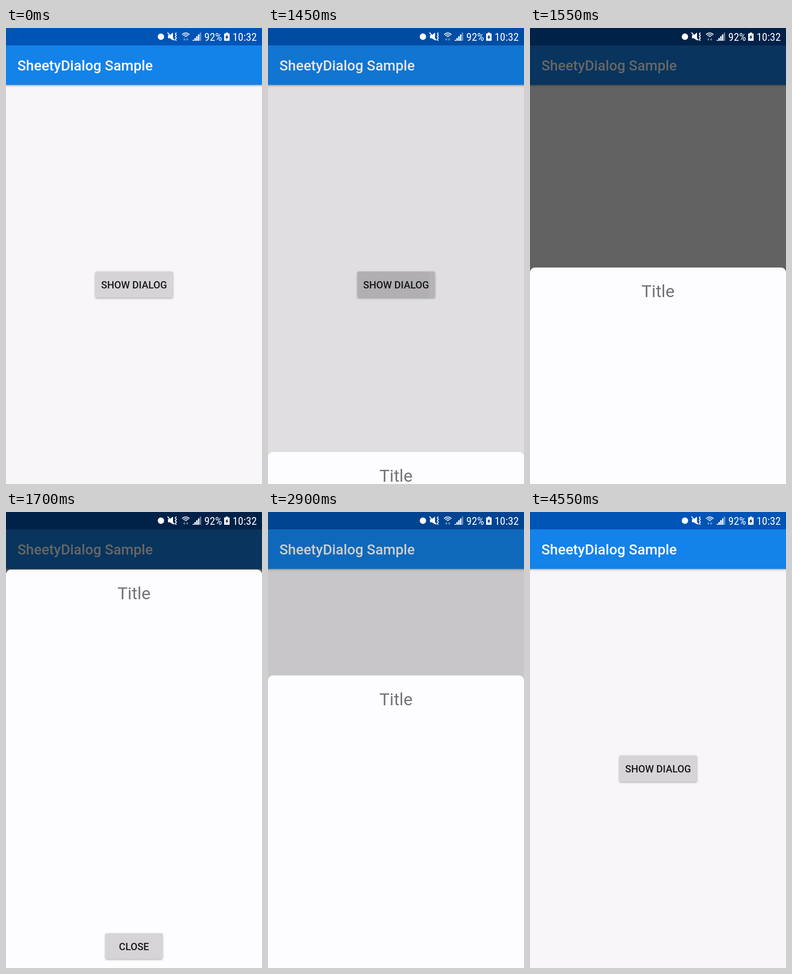
An HTML page with a canvas for the animation above (5.55 s loop, 561 by 998 pixels).

```html
<!DOCTYPE html>
<html lang="en">
<head>
<meta charset="utf-8">
<title>Bottom sheet dialog</title>
<style>
  html, body { margin: 0; width: 100%; height: 100%; overflow: hidden; background: #f8f6f9; }
  canvas { display: block; }
</style>
</head>
<body>
<canvas id="stage" width="561" height="998"></canvas>
<script>
const W = 561, H = 998, LOOP = 5550, STEP = 50;
const STATUS_H = 38, BAR_BOTTOM = 124.5, SHEET_TOP = 126;
const SLIDE = 290, FADE = 120, MAX_DIM = 0.6;
const OPEN = 1397, CLOSE = 2800;
const FAINT = 'rgba(255,255,255,.45)';
const ctx = document.getElementById('stage').getContext('2d');

const ramp = (t, start, length) => Math.min(1, Math.max(0, (t - start) / length));
const ease = p => (1 - Math.cos(Math.PI * p)) / 2;

function rect(x, y, w, h, color) {
  ctx.fillStyle = color;
  ctx.fillRect(x, y, w, h);
}

function circle(x, y, r, color) {
  ctx.fillStyle = color;
  ctx.beginPath();
  ctx.arc(x, y, r, 0, 2 * Math.PI);
  ctx.fill();
}

function trace(points) {
  ctx.beginPath();
  points.forEach(([x, y]) => ctx.lineTo(x, y));
}

function poly(points, color) {
  trace(points);
  ctx.fillStyle = color;
  ctx.fill();
}

function line(points) {
  trace(points);
  ctx.strokeStyle = '#fff';
  ctx.lineWidth = 2;
  ctx.stroke();
}

function text(str, x, y, font, color, align = 'center') {
  ctx.font = `${font} Roboto, sans-serif`;
  ctx.textAlign = align;
  ctx.fillStyle = color;
  ctx.fillText(str, x, y);
}

function withShadow(blur, offset, alpha, draw) {
  ctx.save();
  ctx.shadowColor = `rgba(0,0,0,${alpha})`;
  ctx.shadowBlur = blur;
  ctx.shadowOffsetY = offset;
  draw();
  ctx.restore();
}

function button(label, x, y, w, h, elapsed) {
  ctx.beginPath();
  ctx.roundRect(x, y, w, h, 3);
  ctx.fillStyle = '#d6d4d7';
  withShadow(4, 1.5, 0.35, () => ctx.fill());

  // Touch ripple: a tint over the whole button and a growing circle.
  const press = ramp(elapsed, -50, 150) * (1 - ramp(elapsed, 450, 150));
  if (press > 0) {
    ctx.save();
    ctx.clip();
    rect(x, y, w, h, `rgba(0,0,0,${0.065 * press})`);
    circle(x + w * 0.45, y + h / 2, 15 + Math.max(0, elapsed) * 0.17, `rgba(0,0,0,${0.02 * press})`);
    ctx.restore();
  }
  text(label, x + w / 2, y + 37, '500 21.8px', '#19181b');
}

function muteIcon() {
  poly([[355, 15.5], [359, 15.5], [366, 10], [366, 27], [359, 22.5], [355, 22.5]], '#fff');
  line([[354, 10], [369, 27]]);
  line(Array.from({ length: 7 }, (_, i) => [i % 2 ? 371 : 373.3, 10 + i * 3]));
}

function wifiIcon(receiving) {
  ctx.strokeStyle = '#fff';
  ctx.lineWidth = 1.8;
  for (let r = 3; r < 11; r += 3.6) {
    ctx.beginPath();
    ctx.arc(394, 21, r, -Math.PI * 0.79, -Math.PI * 0.21);
    ctx.stroke();
  }
  const down = receiving ? '#fff' : FAINT;
  rect(390, 22, 1.5, 3, down);
  poly([[388, 24.5], [393.5, 24.5], [390.8, 28]], down);
  rect(396.3, 25, 1.5, 3, FAINT);
  poly([[394.3, 25.5], [399.8, 25.5], [397, 22]], FAINT);
}

function signalIcon() {
  for (let i = 0; i < 5; i++) {
    const h = 2 + i * 4;
    rect(409 + i * 3.9, 28 - h, 3, h, i < 4 ? '#fff' : FAINT);
  }
}

function batteryIcon() {
  rect(481.5, 10, 5, 2, '#fff');
  rect(478, 12, 12, 16, '#fff');
  poly([[485.5, 14], [480.5, 21], [483.5, 21], [482.5, 26], [487.5, 18.8], [484.5, 18.8]], '#06275a');
}

function statusIcons(t) {
  const font = 'condensed 24px "Roboto Condensed",';
  circle(339.5, 19, 7, '#fff');
  muteIcon();
  wifiIcon(t >= 3500 && t < 4550);
  signalIcon();
  text('92%', 454, 28, font, '#fff');
  batteryIcon();
  text('10:32', 523, 28, font, '#fff');
}

function sheet(top, t) {
  ctx.beginPath();
  ctx.roundRect(0, top, W, H, 11);
  ctx.fillStyle = '#fdfcff';
  ctx.fill();
  text('Title', W / 2, top + 65, '37.4px', '#747276');
  button('CLOSE', 218, top + 796, 125, 56, t - 2750);
}

function render(t) {
  rect(0, 0, W, H, '#f8f6f9');
  button('SHOW DIALOG', 196, 533, 169.5, 57, t - 1050);
  withShadow(5, 1.5, 0.4, () => rect(-10, STATUS_H, W + 20, BAR_BOTTOM - STATUS_H, '#1382e9'));
  rect(0, 0, W, STATUS_H, '#0054b5');
  text('SheetyDialog Sample', 25, 93, '500 31.2px', '#fff', 'left');

  const dim = MAX_DIM * (ramp(t, OPEN + 33, FADE) - ramp(t, CLOSE + 19, FADE));
  rect(0, 0, W, H, `rgba(0,0,0,${dim})`);
  statusIcons(t);

  const shown = ease(ramp(t, OPEN, SLIDE)) - ease(ramp(t, CLOSE, SLIDE));
  if (shown > 0) sheet(H - (H - SHEET_TOP) * shown, t);
}

function frame(now) {
  render(Math.floor((now % LOOP) / STEP) * STEP);
  requestAnimationFrame(frame);
}
requestAnimationFrame(frame);
</script>
</body>
</html>
```
